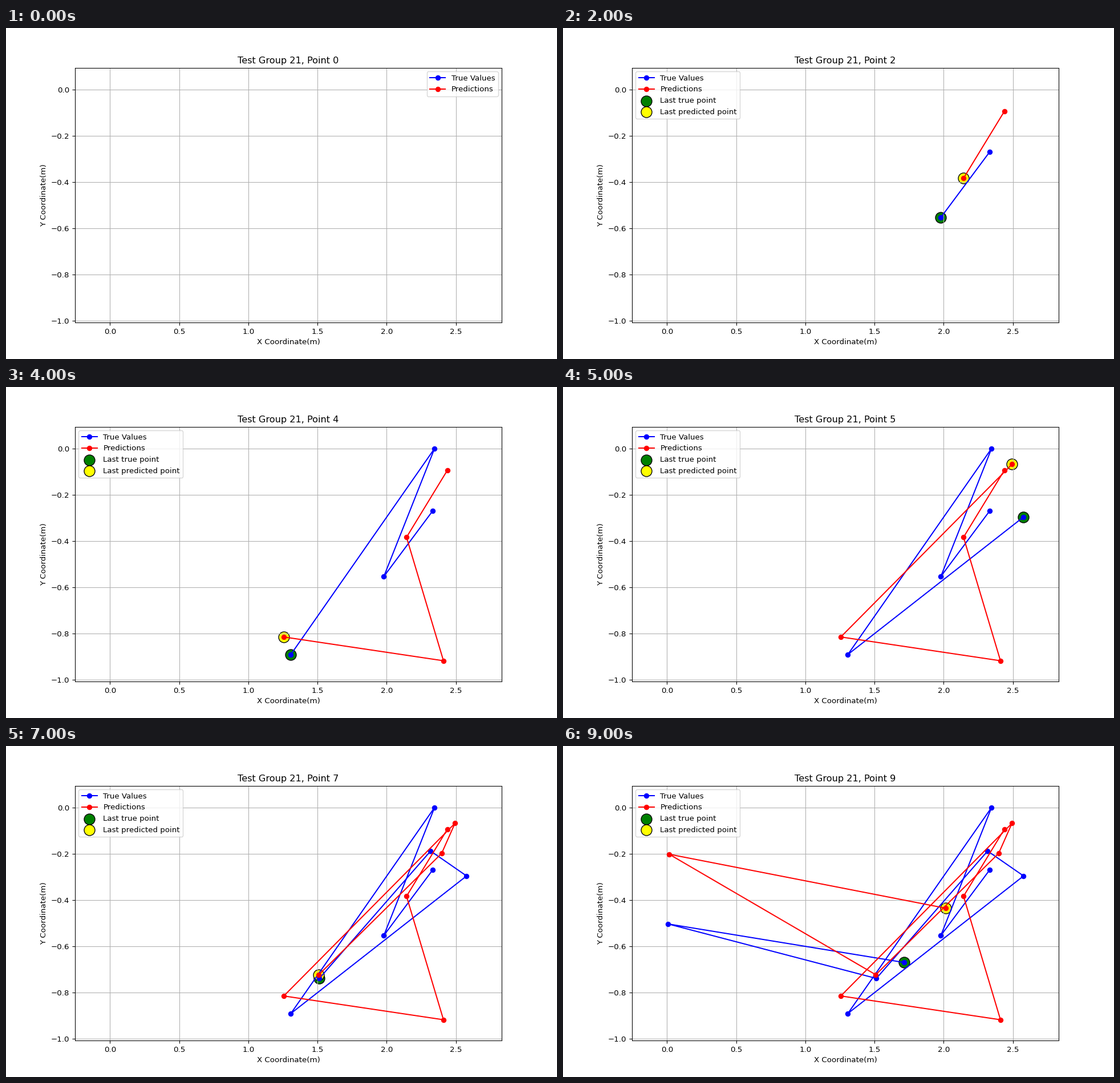
These frames come from a looping animation (966x580 px, 10000 ms). A matplotlib script:

```python
import matplotlib.pyplot as plt
from matplotlib.animation import FuncAnimation

W, H, DPI = 966, 580, 96.6

# Key points of the two tracks, in metres.
TRUE = [(2.333, -0.268), (1.979, -0.553), (2.346, 0.002),
        (1.307, -0.891), (2.577, -0.295), (2.317, -0.187),
        (1.513, -0.739), (0.008, -0.503), (1.715, -0.670)]
PRED = [(2.437, -0.094), (2.143, -0.383), (2.410, -0.918),
        (1.256, -0.815), (2.493, -0.067), (2.397, -0.197),
        (1.509, -0.723), (0.016, -0.201), (2.016, -0.435)]

# The small margin keeps rounding from dropping a pixel.
fig, ax = plt.subplots(figsize=((W + 0.05) / DPI, (H + 0.05) / DPI), dpi=DPI)


def draw_track(points, color, label):
    xs, ys = zip(*points) if points else ((), ())
    ax.plot(xs, ys, color=color, marker="o", label=label)


def mark_last(points, color, label):
    ax.scatter(*points[-1], s=200, c=color, edgecolors="black", linewidths=1,
               label=label)


def draw(n):
    """Show the first n points of both tracks."""
    ax.clear()
    true, pred = TRUE[:n], PRED[:n]
    draw_track(true, "blue", "True Values")
    draw_track(pred, "red", "Predictions")
    if n:
        mark_last(true, "green", "Last true point")
        mark_last(pred, "yellow", "Last predicted point")
    ax.set(xlim=(-0.2536, 2.8324), ylim=(-1.0083, 0.096),
           title=f"Test Group 21, Point {n}",
           xlabel="X Coordinate(m)", ylabel="Y Coordinate(m)")
    ax.grid(True)
    ax.legend(loc="upper left" if n else "upper right")
    return []


anim = FuncAnimation(fig, draw, frames=len(TRUE) + 1,
                     init_func=lambda: draw(0), interval=1000, repeat=True)
plt.show()
```
